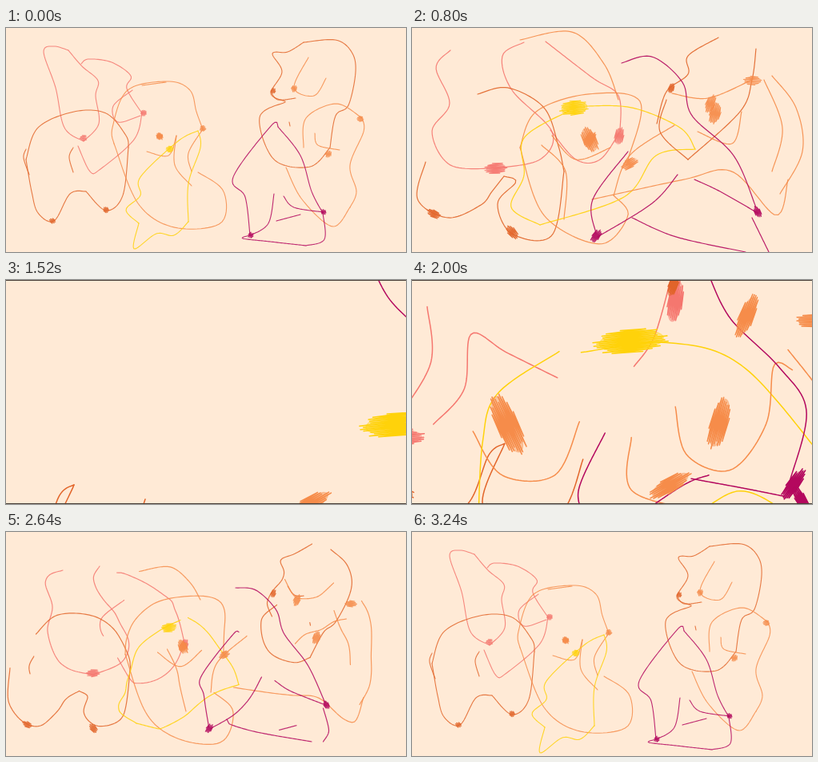
These frames come from a looping animation (500 px wide and 281 px high, 3280 ms). An HTML page with a canvas:

```html
<!DOCTYPE html>
<html lang="en">
<head>
<meta charset="utf-8">
<title>Line figures</title>
<style>
html, body { margin: 0; height: 100%; overflow: hidden; background: #ffead6; }
canvas { display: block; }
</style>
</head>
<body>
<canvas id="stage" width="500" height="281"></canvas>
<script>
const ctx = document.getElementById('stage').getContext('2d');
const LOOP = 3280, STEP = 40, SAMPLES = 60, PAPER = '#ffead6';
const PINK = '#f5776f', RUST = '#e2652a', ORANGE = '#f68c4a', YELLOW = '#ffd20a', MAGENTA = '#b3085e';

// Style of each stage: line width, ink strength, patch half length and breadth ratio.
const WHOLE = { width: 1.1, ink: 0.85, size: 4, ratio: 0.8 };
const BROKEN = { width: 1.2, ink: 0.9, size: 11, ratio: 0.5 };
const NEAR = { width: 1.5, ink: 1, size: 28, ratio: 0.32 };
const GATHER = { width: 1.2, ink: 0.85, size: 7, ratio: 0.55 };

// Time, pose index and style of each key.
const KEYS = [
  [0, 0, WHOLE], [800, 1, BROKEN], [1200, 2, NEAR], [1520, 3, NEAR], [1720, 3, NEAR],
  [2000, 4, NEAR], [2640, 5, GATHER], [3240, 0, WHOLE], [LOOP, 0, WHOLE]
];

// Lines: key points whole, broken and near, then an optional drift out of view.
// Patches: angle, relative size, place whole, broken and near, optional drift.
// The nudge places the figure while it gathers again.
const FIGURES = [
  { color: PINK, nudge: [8, 20], lines: [
    ['78,28 60,23 47,30 62,75 73,125 97,142', '48,28 30,50 47,95 25,130 48,172 105,176', '40,36 44,100 5,165'],
    ['97,142 116,120 112,85 115,66 95,48 78,28', '105,176 160,165 175,130 125,78 113,35 140,18', '47,170 82,130 90,67 130,88 188,117'],
    ['94,45 103,39 132,43 156,60 151,76 170,107', '167,17 225,62 258,85 260,130', '318,0 298,70 275,104'],
    ['170,107 160,140 118,177 105,180 90,148', '260,130 235,165 205,165 173,128'],
    ['158,78 134,98 140,118 168,110']
  ], patches: [
    [-5, 1.2, '97,138', '105,176', '6,186'],
    [-80, 1, '172,107', '259,136', '322,30']
  ] },
  { color: RUST, nudge: [-16, 4], lines: [
    ['25,165 32,205 40,232 60,242 80,208 100,205', '17,168 7,215 45,238 86,222 100,205 115,186', '0,235 35,278 85,262 110,205 128,192', [-43, 65]],
    ['100,205 125,229 146,210 153,150', '115,186 130,193 107,220 125,258 175,260 190,180', '128,192 103,262 150,290 195,268 217,210', [-43, 65]],
    ['25,165 40,125 85,105 125,107 150,135 153,150', '82,83 120,75 165,100 183,148 190,180'],
    ['25,152 22,163 29,184'],
    ['84,150 79,162 84,181']
  ], patches: [
    [25, 0.8, '58,242', '27,233', '6,243'],
    [50, 0.9, '125,228', '125,256', '118,278']
  ] },
  { color: ORANGE, nudge: [14, 6], lines: [
    ['135,145 133,125 152,78 203,67 230,78 238,105 246,127', '135,150 155,105 220,83 285,92 270,165'],
    ['135,145 165,220 210,250 268,245 272,205 240,181', '135,150 165,235 235,271 270,235 252,210'],
    ['176,155 203,160 213,135', '175,135 205,165 248,150', '92,178 125,228 185,228 213,167'],
    ['246,127 228,157 232,180', '328,122 272,160 252,210', '272,185 272,245 345,268'],
    ['213,135 211,172 232,198', '162,147 192,180 190,240'],
    ['170,72 200,68', '135,15 200,5 240,45 258,90']
  ], patches: [
    [-60, 1, '192,136', '222,140'],
    [65, 1.5, '192,136', '222,140', '131,170'],
    [-30, 1, '246,126', '272,170', '316,239', [64, 42]]
  ] },
  { color: YELLOW, nudge: [0, -6], lines: [
    ['240,129 215,142 168,187 168,210 150,228 166,245', '196,104 140,138 140,185 124,225 160,247', '190,87 120,135 103,190 98,281'],
    ['240,129 243,150 228,195 228,243', '215,98 275,100 335,125 354,152', '215,88 315,77 400,105 495,215'],
    ['228,243 210,260 188,258 160,277 166,245', '354,152 305,160 265,212 160,247', '455,275 395,246 325,281 245,273 192,280']
  ], patches: [
    [-6, 1.6, '205,152', '203,100', '272,75', [218, 106]]
  ] },
  { color: RUST, nudge: [5, 0], lines: [
    ['349,92 331,82 345,55 333,32 352,30 372,18', '306,120 318,80 345,58 345,35 383,12'],
    ['372,18 412,15 432,30 437,55 428,97 412,110 405,150', '430,26 425,65 410,105 345,165'],
    ['405,150 380,174 335,165 317,112 349,93', '345,165 310,130 318,90'],
    ['331,80 340,90 362,88'],
    ['354,118 355,123']
  ], patches: [
    [-70, 0.6, '334,79', '324,76', '320,10']
  ] },
  { color: ORANGE, nudge: [-3, 0], lines: [
    ['378,37 360,75 385,85 400,63', '325,82 370,88 425,65', '322,150 335,205 385,222 425,170 434,103 455,108'],
    ['372,150 375,113 413,95 445,113', '357,130 400,145 412,105'],
    ['445,113 447,130 430,172 438,205 430,225', '450,60 480,100 488,155 460,208', '450,85 488,135 500,170'],
    ['430,225 408,249 370,215 350,175', '470,190 455,235 400,180 340,190 225,215'],
    ['386,132 390,147 417,153', '440,65 463,125 450,180']
  ], patches: [
    [-75, 1.2, '403,158', '379,107', '372,168'],
    [-68, 1, '360,76', '373,95', '403,47'],
    [0, 1, '443,114', '426,66', '485,52']
  ] },
  { color: MAGENTA, nudge: [-14, -14], lines: [
    ['340,124 368,160 382,205 396,232', '262,44 300,36 338,68 350,110 402,160 430,225', '360,0 385,50 440,105 471,155 452,235', [95, -25]],
    ['340,124 332,122 284,187 299,212 305,260', '270,155 226,215 230,258', '242,180 212,245 222,281'],
    ['335,208 328,245 306,260', '332,184 300,220 232,262', '360,228 330,240 270,281', [24, 48]],
    ['347,211 360,225 397,231', '353,190 385,205 432,232', '340,232 400,243 445,252'],
    ['305,260 296,264 330,268 375,273', '275,238 330,262 417,281'],
    ['375,273 398,265 396,232', '446,281 425,238'],
    ['338,242 368,234']
  ], patches: [
    [-55, 0.8, '306,260', '230,261', '456,239'],
    [60, 0.7, '397,231', '432,231', '465,256']
  ] }
];

const mix = (a, b, u) => a + (b - a) * u;
const mixPoint = (a, b, u) => [mix(a[0], b[0], u), mix(a[1], b[1], u)];
const shift = (points, [dx, dy]) => points.map(([x, y]) => [x + dx, y + dy]);
const enlarge = (points, s) => points.map(([x, y]) => [250 + (x - 250) * s, 140 + (y - 140) * s]);

function noise(n) {
  const s = Math.sin(n * 127.1 + 11.7) * 43758.5453;
  return s - Math.floor(s);
}

function spline(a, b, c, d, u) {
  return b + u * (c - a + u * (2 * a - 5 * b + 4 * c - d + u * (3 * (b - c) + d - a))) / 2;
}

// Smooth curve through the key points, sampled evenly along its length.
function curve(text) {
  const points = text.split(' ').map(p => p.split(',').map(Number));
  const last = points.length - 1;
  if (!last) return points;
  const at = i => points[Math.max(0, Math.min(last, i))];
  const fine = [];
  for (let i = 0; i < last; i++)
    for (let k = 0; k < 16; k++)
      fine.push([0, 1].map(j => spline(at(i - 1)[j], at(i)[j], at(i + 1)[j], at(i + 2)[j], k / 16)));
  fine.push(at(last));
  const len = [0];
  for (let i = 1; i < fine.length; i++)
    len.push(len[i - 1] + Math.hypot(fine[i][0] - fine[i - 1][0], fine[i][1] - fine[i - 1][1]));
  return Array.from({ length: SAMPLES }, (_, s) => {
    const goal = len[len.length - 1] * s / (SAMPLES - 1);
    let i = 1;
    while (i < fine.length - 1 && len[i] < goal) i++;
    return mixPoint(fine[i - 1], fine[i], (goal - len[i - 1]) / (len[i] - len[i - 1]));
  });
}

// Way out of view, straight away from the upper middle.
function outward(points) {
  const [x, y] = points[points.length >> 1];
  const dist = Math.hypot(x - 250, y - 60);
  return [(x - 250) / dist * 400, (y - 60) / dist * 400];
}

// Six poses: whole, broken, near, gone, near again, gathering.
function makePoses([whole, broken, near, drift], nudge) {
  const a = curve(whole);
  const b = broken ? curve(broken) : enlarge(a, 1.4);
  const c = near ? curve(near) : enlarge(b, 1.4);
  const again = shift(enlarge(c, 1.1), [0, 8]);
  const gather = shift(a.map((p, i) => mixPoint(p, b[i], 0.5)), nudge);
  const points = [a, b, c, shift(c, drift || outward(c)), again, gather];
  const shown = [1, +!!broken, +!!near, +!!near, +!!near, broken ? 1 : 0.6];
  return points.map((pts, i) => ({ pts, shown: shown[i] }));
}

const lines = [], patches = [];
for (const { color, nudge, lines: paths, patches: spots } of FIGURES) {
  for (const path of paths) lines.push({ color, poses: makePoses(path, nudge) });
  for (const [angle, size, ...path] of spots)
    patches.push({ color, size, turn: angle * Math.PI / 180, poses: makePoses(path, nudge) });
}

function drawLine({ color, poses }, from, to, u) {
  const a = poses[from], b = poses[to];
  const count = Math.round(SAMPLES * mix(a.shown, b.shown, u));
  ctx.strokeStyle = color;
  ctx.beginPath();
  for (let i = 0; i < count; i++) ctx.lineTo(...mixPoint(a.pts[i], b.pts[i], u));
  ctx.stroke();
}

// A ring filled with a quick back-and-forth scribble.
function drawPatch({ color, size, turn, poses }, from, to, u, style, seed) {
  const a = poses[from], b = poses[to];
  const rx = mix(style.size, style.size * size, Math.min(1, style.size / 11)) * mix(a.shown, b.shown, u);
  const ry = rx * style.ratio, rows = Math.round(3 + ry * 1.5);
  if (rx < 1) return;
  ctx.save();
  ctx.translate(...mixPoint(a.pts[0], b.pts[0], u));
  ctx.rotate(turn);
  ctx.strokeStyle = ctx.fillStyle = color;
  ctx.beginPath();
  for (let i = 0; i <= rows; i++) {
    const v = 2 * i / rows - 1;
    const reach = (0.3 + 0.7 * Math.sqrt(1 - v * v)) * mix(0.7, 1.1, noise(seed * 50 + i));
    ctx.lineTo((i % 2 ? 1 : -1) * rx * reach, ry * v);
  }
  ctx.stroke();
  ctx.beginPath();
  ctx.ellipse(0, 0, rx * 0.9, ry * 0.9, 0, 0, 7);
  ctx.globalAlpha = Math.min(0.4, rx / 40);
  ctx.fill();
  ctx.stroke();
  ctx.restore();
}

function draw(t) {
  const k = KEYS.findIndex((key, i) => t < KEYS[i + 1][0]);
  const [t0, from, styleA] = KEYS[k], [t1, to, styleB] = KEYS[k + 1];
  let u = (t - t0) / (t1 - t0);
  const zoom = from === 3 && to === 3 ? 1 + 0.4 * Math.sin(Math.PI * u) : 1;
  if (from === 0) u = u ** 1.4;
  else if (to === 0) u = 1 - (1 - u) ** 1.4;
  const style = {};
  for (const name in styleA) style[name] = mix(styleA[name], styleB[name], u);

  ctx.globalAlpha = 1;
  ctx.fillStyle = PAPER;
  ctx.fillRect(0, 0, 500, 281);
  ctx.save();
  ctx.translate(250, 140);
  ctx.scale(zoom, zoom);
  ctx.translate(-250, -140);
  ctx.lineCap = ctx.lineJoin = 'round';
  ctx.lineWidth = style.width;
  ctx.globalAlpha = style.ink;
  lines.forEach(line => drawLine(line, from, to, u));
  patches.forEach((patch, i) => drawPatch(patch, from, to, u, style, i));
  ctx.restore();

  if (t >= 1000 && t < 2280) {
    ctx.fillStyle = '#4a4038';
    ctx.fillRect(0, 0, 500, 1);
    ctx.fillRect(0, 280, 500, 1);
  }
}

const start = performance.now();
function tick() {
  const t = (performance.now() - start) % LOOP;
  draw(Math.floor(t / STEP) * STEP);
  requestAnimationFrame(tick);
}
tick();
</script>
</body>
</html>
```
